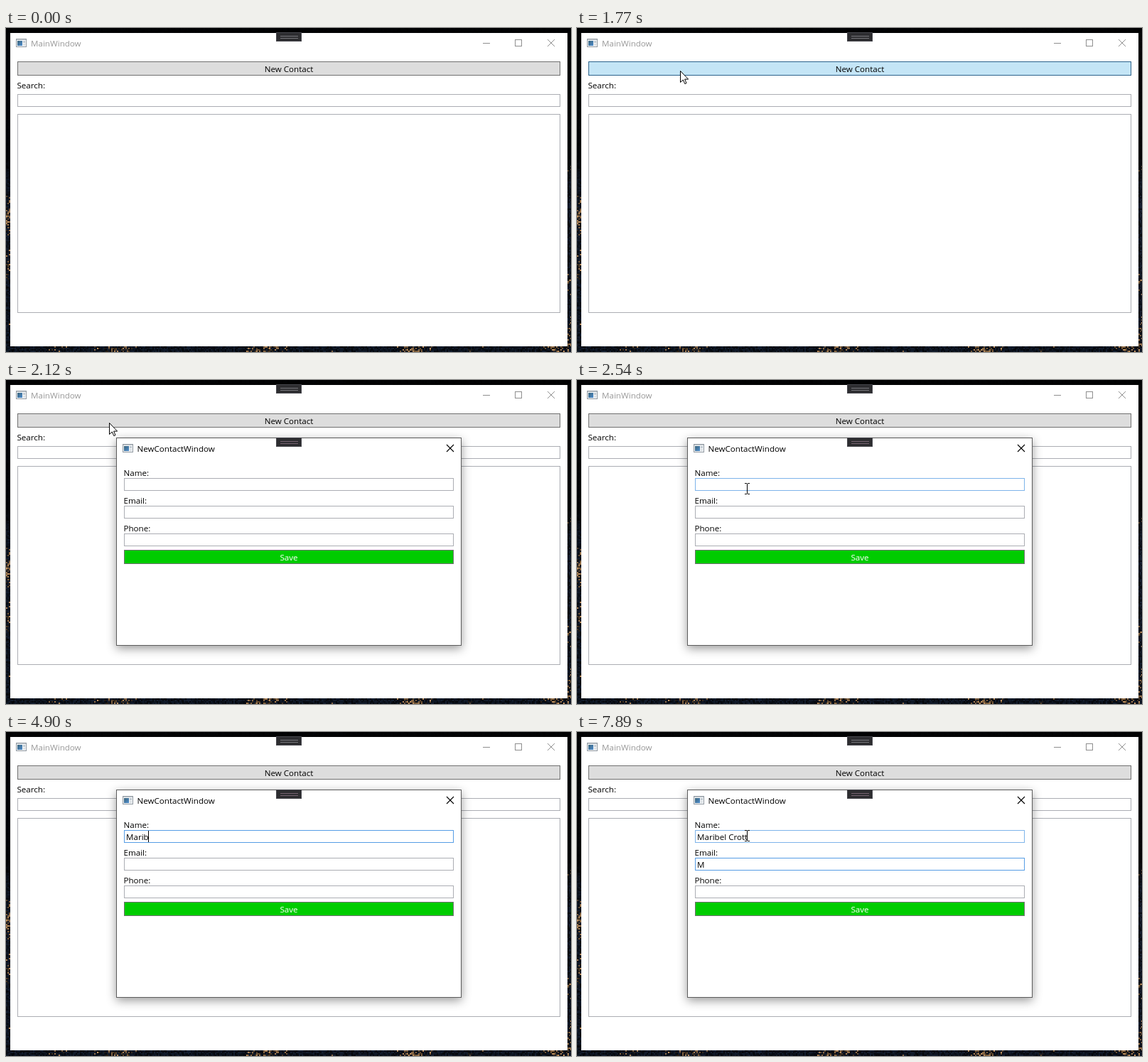
These frames come from a looping animation (795 px wide and 456 px high, 8 s). An HTML page with a canvas:

```html
<!DOCTYPE html>
<html lang="en">
<head>
<meta charset="utf-8">
<title>New contact form</title>
<style>
html, body { margin: 0; width: 100%; height: 100%; overflow: hidden; background: #050508; }
canvas, svg { position: absolute; left: 0; top: 0; display: block; }
text { font: 11.6px "Open Sans", "Noto Sans", sans-serif; white-space: pre; }
rect { shape-rendering: crispEdges; }
.mid { text-anchor: middle; }
.box { fill: #fff; stroke: #abadb3; }
.frame { fill: #fff; stroke: #5c5c5c; filter: drop-shadow(0 4px 7px rgba(0, 0, 0, .4)); }

.search, .button, .name, .email, .dialog, .bar, .cursor, .arrow, .beam {
  animation: 8s step-end infinite;
}
.search { animation-name: search; }
.button { animation-name: button; fill: #ddd; stroke: #707070; }
.name { animation-name: name; }
.email { animation-name: email; }
.dialog { animation-name: open; transform-origin: 398px 227.5px; }
.bar { animation-name: fade; }
.cursor { animation-name: move; }
.arrow { animation-name: arrow; }
.beam { animation-name: beam; }

@keyframes search {
  10.3% { stroke: #7eb4ea; }
  15.3%, 100% { stroke: #abadb3; }
}
@keyframes button {
  15.3% { fill: #bee6fd; stroke: #3c7fb1; }
  22.1% { fill: #c4e5f6; stroke: #2c628b; }
  23%, 100% { fill: #ddd; stroke: #707070; }
}
@keyframes name {
  31.7% { stroke: #7eb4ea; }
  34.5% { stroke: #569de5; }
  78.6%, 100% { stroke: #7eb4ea; }
}
@keyframes email {
  0% { stroke: #abadb3; }
  78.6%, 100% { stroke: #569de5; }
}
@keyframes open {
  0% { opacity: 0; transform: scale(.92); }
  23.8% { opacity: .15; transform: scale(.945); }
  24.6% { opacity: .5; transform: scale(.977); }
  25.5% { opacity: .85; transform: scale(.994); }
  26.4%, 100% { opacity: 1; transform: none; }
}
@keyframes fade {
  0% { opacity: 0; }
  24.6% { opacity: .5; }
  25.5% { opacity: .85; }
  26.4%, 100% { opacity: 1; }
}
@keyframes move {
  0%, 1.6% { transform: translate(345px, 346px); animation-timing-function: steps(4); }
  5.2% { transform: translate(200px, 190px); animation-timing-function: steps(4); }
  8.6% { transform: translate(112px, 110px); animation-timing-function: steps(3); }
  11.1% { transform: translate(93px, 97px); animation-timing-function: steps(3); }
  13.6% { transform: translate(93px, 93px); }
  14.4% { transform: translate(94px, 78px); }
  15.3% { transform: translate(106px, 66px); animation-timing-function: steps(3); }
  18% { transform: translate(145px, 60px); }
  26.4% { transform: translate(145px, 60px); animation-timing-function: steps(4); }
  30% { transform: translate(237px, 155px); }
  31.7% { transform: translate(239px, 153px); animation-timing-function: steps(3); }
  34.4% { transform: translate(239px, 141px); animation-timing-function: steps(2); }
  36.2%, 100% { transform: translate(239px, 146px); }
}
@keyframes arrow {
  0% { visibility: hidden; }
  1.6% { visibility: visible; }
  10.3% { visibility: hidden; }
  14.4% { visibility: visible; }
  31.7%, 100% { visibility: hidden; }
}
@keyframes beam {
  0% { visibility: hidden; }
  10.3% { visibility: visible; }
  14.4% { visibility: hidden; }
  31.7% { visibility: visible; }
  53% { visibility: hidden; }
  78.6%, 100% { visibility: visible; }
}
</style>
</head>
<body>
<canvas id="desk" width="795" height="456"></canvas>
<svg width="795" height="456" viewBox="0 0 795 456">
  <defs>
    <linearGradient id="pane" x2="1" y2="1">
      <stop stop-color="#3c6478"/><stop offset="1" stop-color="#4f8fd0"/>
    </linearGradient>
    <g id="icon">
      <rect x=".5" y=".5" width="14" height="11" fill="#f2f4f6" stroke="#929aa2"/>
      <rect x="1" y="1" width="13" height="1" fill="#c3cad0"/>
      <rect x="2" y="3" width="7" height="7" fill="url(#pane)"/>
      <rect x="10" y="3" width="3" height="3" fill="#c4ccd3"/>
      <rect x="10" y="7" width="3" height="3" fill="#dbe0e4"/>
    </g>
    <g id="tools">
      <rect x=".5" y=".5" width="35" height="12" fill="#2d2d30" stroke="#46464c"/>
      <path d="M6 5.5H31M6 8.5H31" stroke="currentColor"/>
    </g>
    <path id="close" d="M0 0L10 10M10 0L0 10" fill="none"/>
  </defs>

  <rect x="6" y="7" width="784" height="441" fill="#fff"/>
  <use href="#icon" x="14" y="15"/>
  <text x="35" y="26" fill="#999">MainWindow</text>
  <g stroke="#8f8f8f" fill="none">
    <path d="M671 21.5H681"/>
    <rect x="716.5" y="16.5" width="9" height="9"/>
    <use href="#close" x="762" y="16"/>
  </g>
  <use href="#tools" x="380" y="6" color="#77777c"/>

  <rect class="button" x="16.5" y="47.5" width="763" height="19"/>
  <text class="mid" x="398" y="62">New Contact</text>
  <text x="15.5" y="85">Search:</text>
  <rect class="box search" x="16.5" y="93.5" width="763" height="17"/>
  <rect class="box" x="16.5" y="121.5" width="763" height="279"/>

  <g class="dialog">
    <rect class="frame" x="155.5" y="81.5" width="485" height="292"/>
    <use href="#icon" x="164" y="90"/>
    <text x="184.5" y="101">NewContactWindow</text>
    <use href="#close" x="620" y="91" stroke="#000" stroke-width="1.1"/>
    <text x="165.5" y="135">Name:</text>
    <rect class="box name" x="166.5" y="138.5" width="463" height="17"/>
    <text x="165.5" y="174">Email:</text>
    <rect class="box email" x="166.5" y="177.5" width="463" height="17"/>
    <text x="165.5" y="213">Phone:</text>
    <rect class="box" x="166.5" y="216.5" width="463" height="17"/>
    <rect x="166.5" y="239.5" width="463" height="19" fill="#0c0" stroke="#707070"/>
    <text class="mid" x="398" y="254" fill="#fff">Save</text>
    <text id="name" x="169" y="152"></text>
    <text id="email" x="169" y="191"></text>
    <rect id="caret" width="1" height="16" visibility="hidden"/>
  </g>
  <use class="bar" href="#tools" x="380" y="81" color="#75626f"/>

  <g class="cursor">
    <path class="arrow" d="M.5 .5V16.5L4.3 13L6.8 18.6L9 17.6L6.6 12.1H11.6Z" fill="#fff" stroke="#000"/>
    <path class="beam" d="M-3 -7.5H0M1 -7.5H4M.5 -7V7M-3 7.5H0M1 7.5H4" fill="none" stroke="#000"/>
  </g>
</svg>
<script>
const LOOP = 8000;
const $ = id => document.getElementById(id);

// Speckled night wallpaper, visible only around the window.
function paintDesk() {
  const g = $('desk').getContext('2d');
  let seed = 7;
  const rand = () => (seed = seed * 16807 % 2147483647) / 2147483647;
  for (let y = 0; y < 456; y += 2) {
    const depth = Math.min(1, Math.max(.12, (y - 175) / 50));
    for (let x = 0; x < 795; x += 2) {
      if (x > 6 && x < 789 && y > 7 && y < 447) continue;
      const clump = Math.sin(x * .045 + y * .03) * Math.sin(x * .017 + y * .05 + 1);
      const lit = depth * (.2 + rand());
      const gold = depth > .3 && rand() < clump * .5;
      const [r, gr, b] = gold ? [165, 125, 82] : [16, 25, 40];
      g.fillStyle = `rgb(${r * lit | 0},${gr * lit | 0},${b * lit | 0})`;
      g.fillRect(x, y, 2, 2);
    }
  }
}

const fields = [
  { el: $('name'), text: 'Maribel Crott', caretY: 139, from: 2760, to: 6290,
    keys: [4170, 4440, 4560, 4680, 4790, 4910, 5030, 5230, 5360, 5560, 5690, 5830, 5960],
    blinks: [[3290, 3820]] },
  { el: $('email'), text: 'M', caretY: 178, from: 6290, to: LOOP,
    keys: [7360], blinks: [[6900, 7360], [7890, LOOP]] }
];
const within = (t, [a, b]) => t >= a && t < b;

function render(t) {
  const caret = $('caret');
  let shown = false;
  for (const f of fields) {
    const typed = f.text.slice(0, f.keys.filter(k => k <= t).length);
    if (f.el.textContent !== typed) f.el.textContent = typed;
    if (!within(t, [f.from, f.to]) || f.blinks.some(b => within(t, b))) continue;
    shown = true;
    const width = typed ? f.el.getComputedTextLength() : 0;
    caret.setAttribute('x', Math.floor(169 + width));
    caret.setAttribute('y', f.caretY);
  }
  caret.setAttribute('visibility', shown ? 'visible' : 'hidden');
}

let start;
function tick(now) {
  start ??= now;
  render((now - start + 8) % LOOP);
  requestAnimationFrame(tick);
}

paintDesk();
requestAnimationFrame(tick);
</script>
</body>
</html>
```
